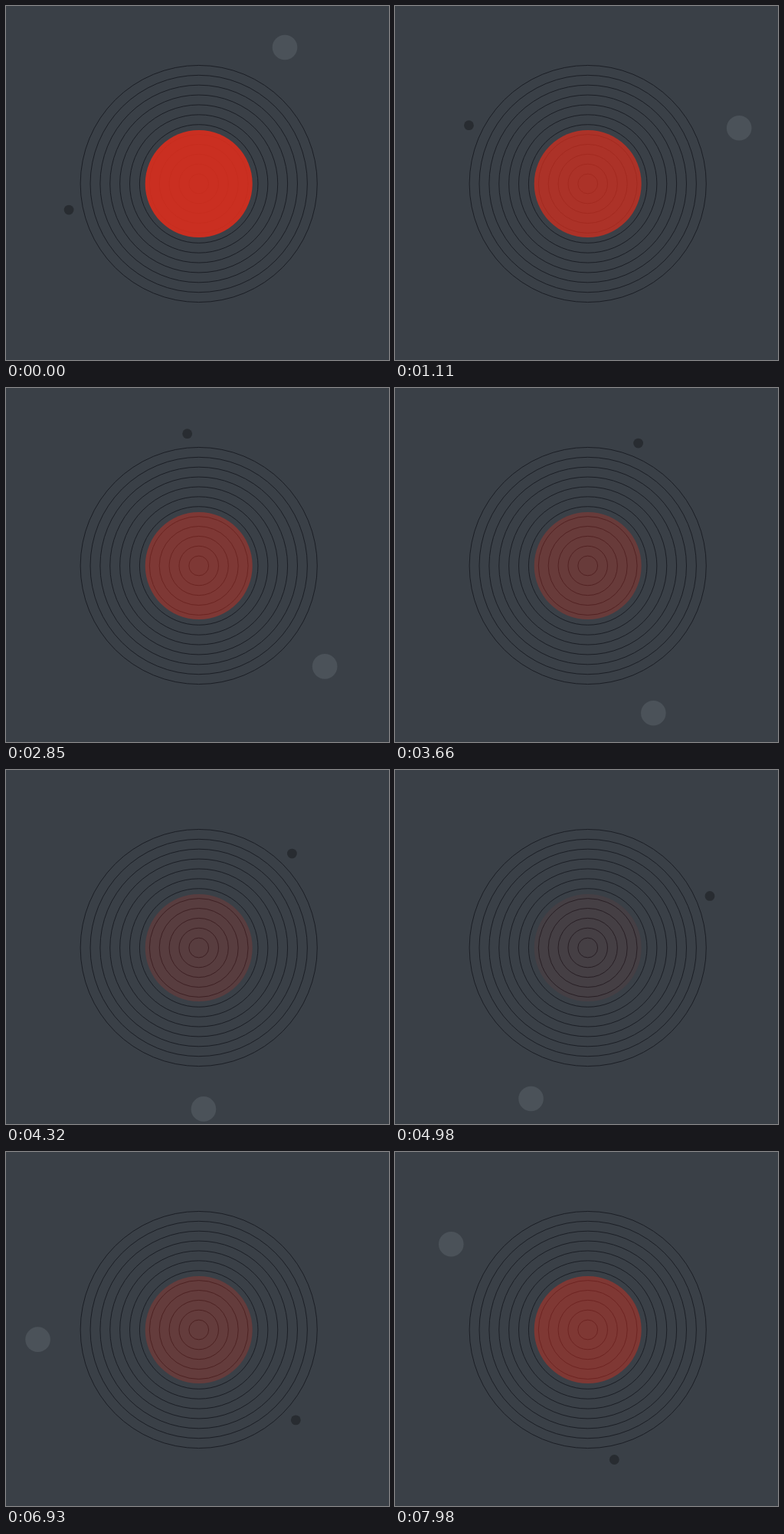
These frames come from a looping animation (500 by 462 pixels, 8000 ms). An HTML page with a canvas:

```html
<!DOCTYPE html>
<html lang="en">
<head>
<meta charset="utf-8">
<title>Orbiting discs</title>
<style>
  html, body { margin: 0; width: 100%; height: 100%; overflow: hidden; background: #3a4047; }
  canvas { display: block; width: 500px; height: 462px; }
</style>
</head>
<body>
<canvas id="stage" width="500" height="462"></canvas>
<script>
const ctx = document.getElementById('stage').getContext('2d');
const LOOP = 8000, STEP = 30;
const CX = 251.7, CY = 232;
const RINGS = 12, RING_GAP = 12.88;
const DEG_PER_MS = 0.03381;
const FADE_END = 5390, MAX_ALPHA = 0.9;

const moons = [
  { orbit: 210.5, start: -57.75, r: 16.3, color: '#4b5259' },
  { orbit: 173, start: 168.65, r: 6.4, color: '#282c31' }
];

function circle(x, y, r) {
  ctx.beginPath();
  ctx.arc(x, y, r, 0, Math.PI * 2);
}

function drawRings() {
  ctx.strokeStyle = '#1b1e25';
  ctx.lineWidth = 1;
  for (let i = 1; i <= RINGS; i++) {
    circle(CX, CY, i * RING_GAP);
    ctx.stroke();
  }
}

// The disc fades out linearly, then back in at the same rate.
function drawDisc(t) {
  ctx.globalAlpha = MAX_ALPHA * Math.abs(t - FADE_END) / FADE_END;
  ctx.fillStyle = '#da2e1d';
  circle(CX, CY, 70);
  ctx.fill();
  ctx.globalAlpha = 1;
}

function drawMoon(moon, t) {
  const a = (moon.start + t * DEG_PER_MS) * Math.PI / 180;
  ctx.fillStyle = moon.color;
  circle(CX + moon.orbit * Math.cos(a), CY + moon.orbit * Math.sin(a), moon.r);
  ctx.fill();
}

function draw(t) {
  ctx.fillStyle = '#3a4047';
  ctx.fillRect(0, 0, 500, 462);
  drawRings();
  drawDisc(t);
  moons.forEach(moon => drawMoon(moon, t));
}

let origin = null;
function tick(now) {
  if (origin === null) origin = now;
  const t = (now - origin) % LOOP;
  draw(Math.floor(t / STEP) * STEP);
  requestAnimationFrame(tick);
}
draw(0);
requestAnimationFrame(tick);
</script>
</body>
</html>
```
